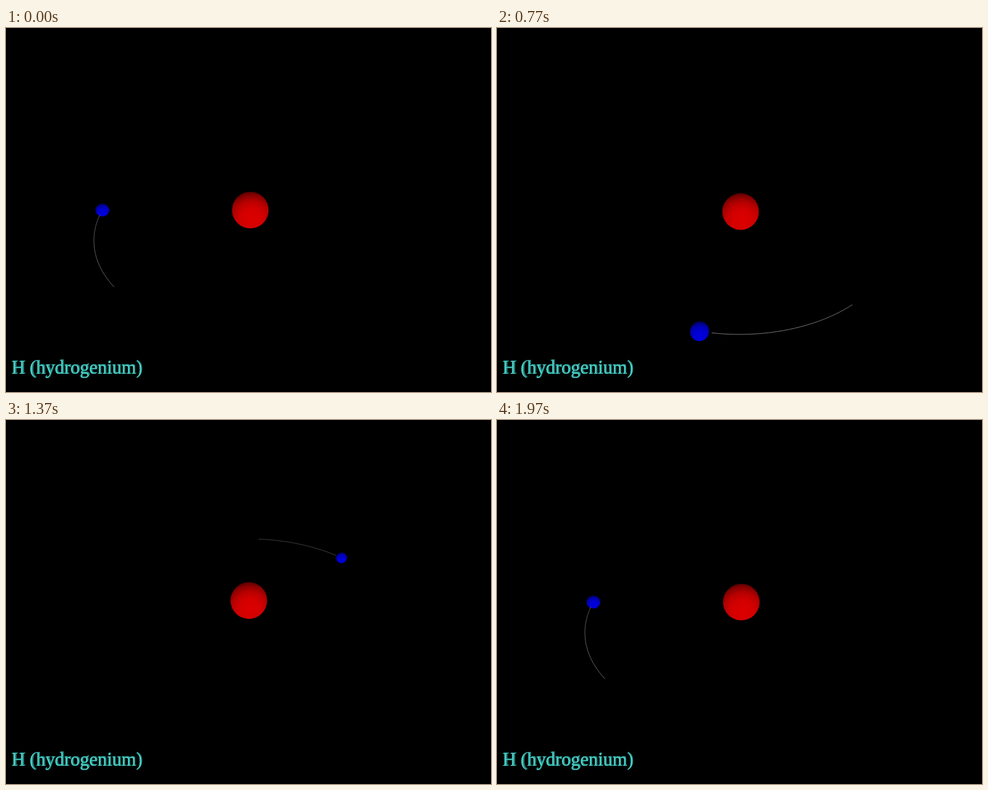
Recreate the animation shown at these times as an HTML page with a canvas. Size 800 by 600 pixels, loop 2000 ms.

```html
<!DOCTYPE html>
<html lang="en">
<head>
<meta charset="utf-8">
<title>H (hydrogenium)</title>
<style>
  html, body { margin: 0; width: 100%; height: 100%; overflow: hidden; background: #000; }
  canvas { display: block; }
</style>
</head>
<body>
<canvas id="stage" width="800" height="600"></canvas>
<script>
const ctx = document.getElementById('stage').getContext('2d');
const TAU = Math.PI * 2;
const LOOP = 2000, STEPS = 59;
const CX = 400, CY = 300, FOCAL = 604;
const ORBIT_X = 241, ORBIT_Y = 138, DEPTH = 0.327;
const ELECTRON = 10.55, NUCLEUS = 30.2;
const TRAIL = Math.PI / 4;

// Perspective view of a point on the tilted circular orbit
function project(angle) {
  const scale = 1 / (1 - DEPTH * Math.sin(angle));
  return {
    x: CX + ORBIT_X * Math.cos(angle) * scale,
    y: CY + ORBIT_Y * Math.sin(angle) * scale,
    scale
  };
}

function ball(x, y, r, shade) {
  const dx = x - CX, dy = y - CY;
  const stretch = Math.hypot(1, Math.hypot(dx, dy) / FOCAL);
  const turn = Math.atan2(dy, dx);
  const lx = x + r * 0.08, ly = y + r * 0.5;
  const light = ctx.createRadialGradient(lx, ly, 0, lx, ly, r * 1.52);
  [[0, 220], [0.4, 211], [0.65, 184], [0.85, 140], [1, 85]]
    .forEach(([stop, level]) => light.addColorStop(stop, shade(level)));
  ctx.fillStyle = light;
  ctx.beginPath();
  ctx.ellipse(x, y, r * stretch, r, turn, 0, TAU);
  ctx.fill();
}

function trail(angle) {
  const start = angle - 1.3 * ELECTRON / ORBIT_X;
  const end = angle - TRAIL;
  const parts = 24;
  ctx.strokeStyle = '#7c7c7c';
  let from = project(start);
  for (let i = 1; i <= parts; i++) {
    const to = project(start + (end - start) * i / parts);
    ctx.lineWidth = 0.65 * to.scale;
    ctx.beginPath();
    ctx.moveTo(from.x, from.y);
    ctx.lineTo(to.x, to.y);
    ctx.stroke();
    from = to;
  }
}

function electron(angle) {
  const p = project(angle);
  const receding = Math.cos(angle) < 0;
  if (!receding) trail(angle);
  ball(p.x, p.y, ELECTRON * p.scale, v => `rgb(0,0,${v})`);
  if (receding) trail(angle);
}

function nucleus(phase) {
  const x = 401.6 + 1.4 * Math.cos(2 * phase);
  const y = 300.1 + 1.83 * Math.sin(phase) - 1.3 * Math.sin(2 * phase);
  ball(x, y, NUCLEUS, v => `rgb(${v},0,0)`);
}

// Extruded lettering: deeper layers shrink towards the vanishing point
function label() {
  const layers = 5, depth = 0.006;
  ctx.font = '31px "Liberation Serif", "Times New Roman", serif';
  ctx.textBaseline = 'alphabetic';
  for (let i = layers; i >= 0; i--) {
    const s = 1 - depth * i / layers;
    ctx.save();
    ctx.translate(CX, CY);
    ctx.scale(s, s);
    ctx.fillStyle = i ? '#237c77' : '#48cfc6';
    ctx.fillText('H (hydrogenium)', 8.7 - CX, 570.4 - CY);
    ctx.restore();
  }
}

function draw(now) {
  const ticks = Math.floor((now % LOOP) / 10);
  const step = Math.floor((ticks + 0.5) * 0.3);
  const phase = TAU * step / STEPS;
  ctx.fillStyle = '#000';
  ctx.fillRect(0, 0, 800, 600);
  nucleus(phase);
  electron(Math.PI + 2 * phase);
  label();
}

let origin = null;
function tick(now) {
  if (origin === null) origin = now;
  draw(now - origin);
  requestAnimationFrame(tick);
}
draw(0);
requestAnimationFrame(tick);
</script>
</body>
</html>
```
